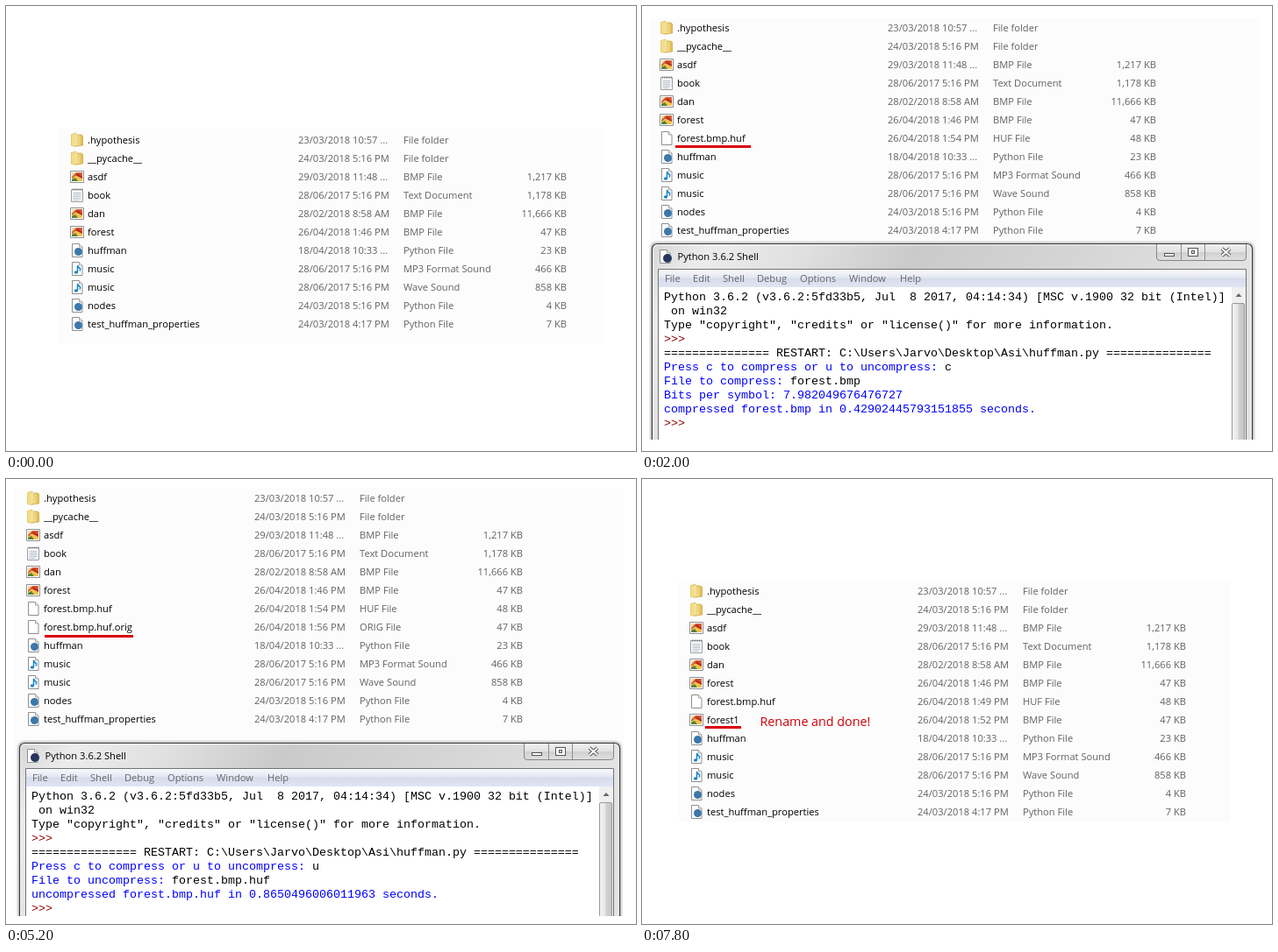
These frames come from a looping animation (718x508 px, 9000 ms). An HTML page:

```html
<!DOCTYPE html>
<html lang="en">
<head>
<meta charset="utf-8">
<title>File compression demo</title>
<style>
html, body { margin: 0; width: 100%; height: 100%; overflow: hidden; background: #fff; }
svg { display: block; }
text { font: 11.15px "Open Sans", "Noto Sans", sans-serif; white-space: pre; }
.meta { fill: #626262; }
.menu { fill: #64666b; }
.shell { font: 13.333px "Liberation Mono", monospace; }
.note { font-size: 14.3px; fill: #d00008; }
</style>
</head>
<body>
<svg id="stage" width="718" height="508" viewBox="0 0 718 508">
<defs>
  <linearGradient id="gold" x2="1"><stop stop-color="#f6e59a"/><stop offset="1" stop-color="#dfb94a"/></linearGradient>
  <linearGradient id="bar" gradientUnits="userSpaceOnUse" x2="685" gradientTransform="skewX(-36)">
    <stop stop-color="#d6d6d6"/><stop offset=".1" stop-color="#ececec"/><stop offset=".26" stop-color="#e0e0e0"/>
    <stop offset=".45" stop-color="#cacaca"/><stop offset=".7" stop-color="#d4d4d4"/><stop offset="1" stop-color="#e2e2e2"/>
  </linearGradient>
  <linearGradient id="menu" x2="0" y2="1"><stop stop-color="#f8f9fc"/><stop offset=".45" stop-color="#e4e8f2"/><stop offset=".5" stop-color="#d6dceb"/><stop offset="1" stop-color="#dfe5f2"/></linearGradient>
  <linearGradient id="button" x2="0" y2="1"><stop stop-color="#efefef"/><stop offset=".48" stop-color="#e2e2e2"/><stop offset=".52" stop-color="#d0d0d0"/><stop offset="1" stop-color="#e0e0e0"/></linearGradient>
  <linearGradient id="thumb" x2="1"><stop stop-color="#f4f4f4"/><stop offset=".48" stop-color="#e6e6e6"/><stop offset=".52" stop-color="#d2d2d4"/><stop offset="1" stop-color="#c4c4c8"/></linearGradient>
  <g id="page">
    <path d="M-5.5-7.5h8l3.500 3.500v11.500h-11.500z" fill="#fff" stroke="#8f8f8f"/>
    <path d="M2.500-7.500v3.500h3.500" fill="#eee" stroke="#a5a5a5"/>
  </g>
  <g id="folder">
    <path d="M-6.500-6.500l5.500-1.500v15.500l-5.500-1z" fill="#f3dd86" stroke="#dcbc5c" stroke-width=".7"/>
    <path d="M0-6h5l1.500 1.500v10.500l-7 1z" fill="url(#gold)" stroke="#c9a33e" stroke-width=".7"/>
    <path d="M-1-6v12" stroke="#fff6cf"/>
  </g>
  <g id="bmp">
    <path d="M-7.500-6.500h15v13h-15z" fill="#fff" stroke="#8c8f94"/>
    <path d="M-6-5h12v10h-12z" fill="#d65a31"/>
    <path d="M-6-5h5l-5 5z" fill="#f6d9a5"/>
    <path d="M-6 2l5-4 7 4v3h-12z" fill="#f0c24d"/>
    <path d="M-6 5v-2l4-2 3 4z" fill="#55813d"/>
    <path d="M-2-2l3-2 5 4v2z" fill="#b92d20"/>
  </g>
  <g id="txt">
    <path d="M-6.500-6.500h13v14h-13z" fill="#f8f9fb" stroke="#9a9fa6"/>
    <path d="M-5-6.500h11" stroke="#70767f" stroke-width="2" stroke-dasharray="1 1"/>
    <path d="M-4.500-2.500h9m-9 2h9m-9 2h9m-9 2h9m-9 2h7" stroke="#b8bfc8"/>
  </g>
  <g id="py"><use href="#page"/><circle cx="1.500" cy="1.500" r="4.500" fill="#3c78aa"/></g>
  <g id="snd">
    <use href="#page"/>
    <path d="M.5 4v-8q.5 2.500 3 3.500.5 1.500-.5 3" fill="none" stroke="#1b87c9" stroke-width="1.500"/>
    <ellipse cx="-1" cy="4" rx="2.200" ry="1.700" fill="#1b87c9"/>
  </g>
</defs>
</svg>
<script>
const stage = document.getElementById("stage");
const RED = "#d90008";

function add(parent, tag, attrs, content) {
  const el = document.createElementNS("http://www.w3.org/2000/svg", tag);
  for (const key in attrs) el.setAttribute(key, attrs[key]);
  if (content !== undefined) el.textContent = content;
  parent.appendChild(el);
  return el;
}
const box = (g, x, y, width, height, fill, more) => add(g, "rect", { x, y, width, height, fill, ...more });
const path = (g, d, stroke, more) => add(g, "path", { d, stroke, fill: "none", ...more });
const label = (g, x, y, content, more) => add(g, "text", { x, y, ...more }, content);

const kinds = {
  folder: "File folder", bmp: "BMP File", txt: "Text Document", py: "Python File",
  mp3: "MP3 Format Sound", wav: "Wave Sound", huf: "HUF File", orig: "ORIG File"
};
const icons = { mp3: "snd", wav: "snd", huf: "page", orig: "page" };

const before = [
  [".hypothesis", "23/03/2018 10:57 ...", "folder", ""],
  ["__pycache__", "24/03/2018 5:16 PM", "folder", ""],
  ["asdf", "29/03/2018 11:48 ...", "bmp", "1,217"],
  ["book", "28/06/2017 5:16 PM", "txt", "1,178"],
  ["dan", "28/02/2018 8:58 AM", "bmp", "11,666"],
  ["forest", "26/04/2018 1:46 PM", "bmp", "47"]
];
const after = [
  ["huffman", "18/04/2018 10:33 ...", "py", "23"],
  ["music", "28/06/2017 5:16 PM", "mp3", "466"],
  ["music", "28/06/2017 5:16 PM", "wav", "858"],
  ["nodes", "24/03/2018 5:16 PM", "py", "4"],
  ["test_huffman_properties", "24/03/2018 4:17 PM", "py", "7"]
];
const made = (name, time, kind, size) => [name, `26/04/2018 ${time} PM`, kind, size];

// x is the left edge of the names, y the middle of the first row
function fileList(g, x, y, extra) {
  [...before, ...extra, ...after].forEach(([name, date, kind, size], i) => {
    const mid = y + 21 * i, base = mid + 4;
    add(g, "use", { href: "#" + (icons[kind] || kind), x: x - 12, y: mid });
    label(g, x, base, name);
    label(g, x + 240, base, date, { class: "meta" });
    label(g, x + 360, base, kinds[kind], { class: "meta" });
    if (size) label(g, x + 546, base, size + " KB", { class: "meta", "text-anchor": "end" });
  });
}

function underline(g, x1, x2, y) {
  path(g, `M${x1} ${y}H${x2}`, RED, { "stroke-width": 3 });
}

function titleBar(g) {
  const outline = "M.5 260V7Q.5.5 7 .5H678Q684.500.5 684.500 7V260";
  for (const width of [7, 5, 3]) path(g, outline, "#000", { "stroke-width": width, opacity: .07 });
  path(g, outline, "#3c3c3c", { fill: "url(#bar)", "stroke-width": 1.2 });
  path(g, "M1.800 260V8Q1.800 1.800 8 1.800H677Q683.200 1.800 683.200 8V260", "#fff", { opacity: .65 });

  add(g, "use", { href: "#page", x: 15, y: 15 });
  add(g, "circle", { cx: 18, cy: 17, r: 5, fill: "#26365f" });
  label(g, 29.5, 19, "Python 3.6.2 Shell");

  path(g, "M575.500 1V16Q575.500 19.500 579 19.500H674Q677.500 19.500 677.500 16V1", "#858585", { fill: "url(#button)" });
  path(g, "M603.500 1V19M630.500 1V19", "#8e8e8e");
  box(g, 584.5, 11.5, 11, 3, "#fff", { stroke: "#555" });
  box(g, 611.5, 5.5, 11, 9, "#fff", { stroke: "#555" });
  box(g, 615.5, 8.5, 3, 3, "#ddd", { stroke: "#555" });
  const cross = "M650 6l9 8m0-8l-9 8";
  path(g, cross, "#555", { "stroke-width": 4 });
  path(g, cross, "#fff", { "stroke-width": 2 });
}

function shell(parent, x, y, lines) {
  const g = add(parent, "g", { transform: `translate(${x} ${y})` });
  titleBar(g);
  box(g, 7, 29, 671, 240, "#fff");
  box(g, 8, 30, 669, 20, "url(#menu)");
  path(g, "M7.500 260V29.500H677.500V260", "#737373");
  const menus = { File: 15, Edit: 47, Shell: 81, Debug: 120, Options: 169, Window: 225, Help: 283 };
  for (const name in menus) label(g, menus[name], 44, name, { class: "menu" });

  box(g, 661, 50, 16, 210, "#f0f0f0");
  path(g, "M665.500 61l3.500-4 3.500 4z", "none", { fill: "#666" });
  box(g, 661.5, 68.5, 14, 200, "url(#thumb)", { stroke: "#9a9a9a", rx: 1.5 });

  lines.forEach((parts, i) => {
    const row = label(g, 14, 65 + 16 * i, undefined, { class: "shell" });
    for (const [content, fill] of parts) add(row, "tspan", { fill }, content);
  });
}

const out = s => [s, "#0000ff"], typed = s => [s, "#000"], prompt = [[">>>", "#8b0000"]];
const rule = "=".repeat(15);
const session = (...lines) => [
  [typed("Python 3.6.2 (v3.6.2:5fd33b5, Jul  8 2017, 04:14:34) [MSC v.1900 32 bit (Intel)]")],
  [typed(" on win32")],
  [typed('Type "copyright", "credits" or "license()" for more information.')],
  prompt,
  [typed(`${rule} RESTART: C:\\Users\\Jarvo\\Desktop\\Asi\\huffman.py ${rule}`)],
  ...lines,
  prompt
];
const ask = "Press c to compress or u to uncompress: ";

function scene(x, y, w, h, draw) {
  const g = add(stage, "g", { display: "none" });
  box(g, x, y, w, h, "#fcfcfc");
  draw(g);
  box(g, 0, y + h, 718, 508 - y - h, "#fff");
  return g;
}

const scenes = [
  scene(59, 139, 622, 247, g => fileList(g, 93, 153, [])),

  scene(9, 14, 695, 481, g => {
    fileList(g, 40, 25, [made("forest.bmp.huf", "1:54", "huf", "48")]);
    underline(g, 38, 124, 160.5);
    shell(g, 11, 271, session(
      [out(ask), typed("c")],
      [out("File to compress: "), typed("forest.bmp")],
      [out("Bits per symbol: 7.982049676476727")],
      [out("compressed forest.bmp in 0.42902445793151855 seconds.")]
    ));
  }),

  scene(10, 10, 694, 489, g => {
    fileList(g, 43, 22, [
      made("forest.bmp.huf", "1:54", "huf", "48"),
      made("forest.bmp.huf.orig", "1:56", "orig", "47")
    ]);
    underline(g, 44, 145, 179.5);
    shell(g, 15, 301, session(
      [out(ask), typed("u")],
      [out("File to uncompress: "), typed("forest.bmp.huf")],
      [out("uncompressed forest.bmp.huf in 0.8650496006011963 seconds.")]
    ));
  }),

  scene(42, 116, 629, 276, g => {
    fileList(g, 74, 128, [
      made("forest.bmp.huf", "1:49", "huf", "48"),
      made("forest1", "1:52", "bmp", "47")
    ]);
    underline(g, 72, 113, 283.5);
    label(g, 134.5, 282, "Rename and done!", { class: "note" });
  })
];

const LOOP = 9000, start = performance.now();
let shown = -1;

function render(time) {
  const next = Math.min(3, Math.floor(time % LOOP / 2000));
  if (next === shown) return;
  scenes.forEach((g, i) => g.setAttribute("display", i === next ? "inline" : "none"));
  shown = next;
}
function tick() {
  render(performance.now() - start);
  requestAnimationFrame(tick);
}
tick();
</script>
</body>
</html>
```
